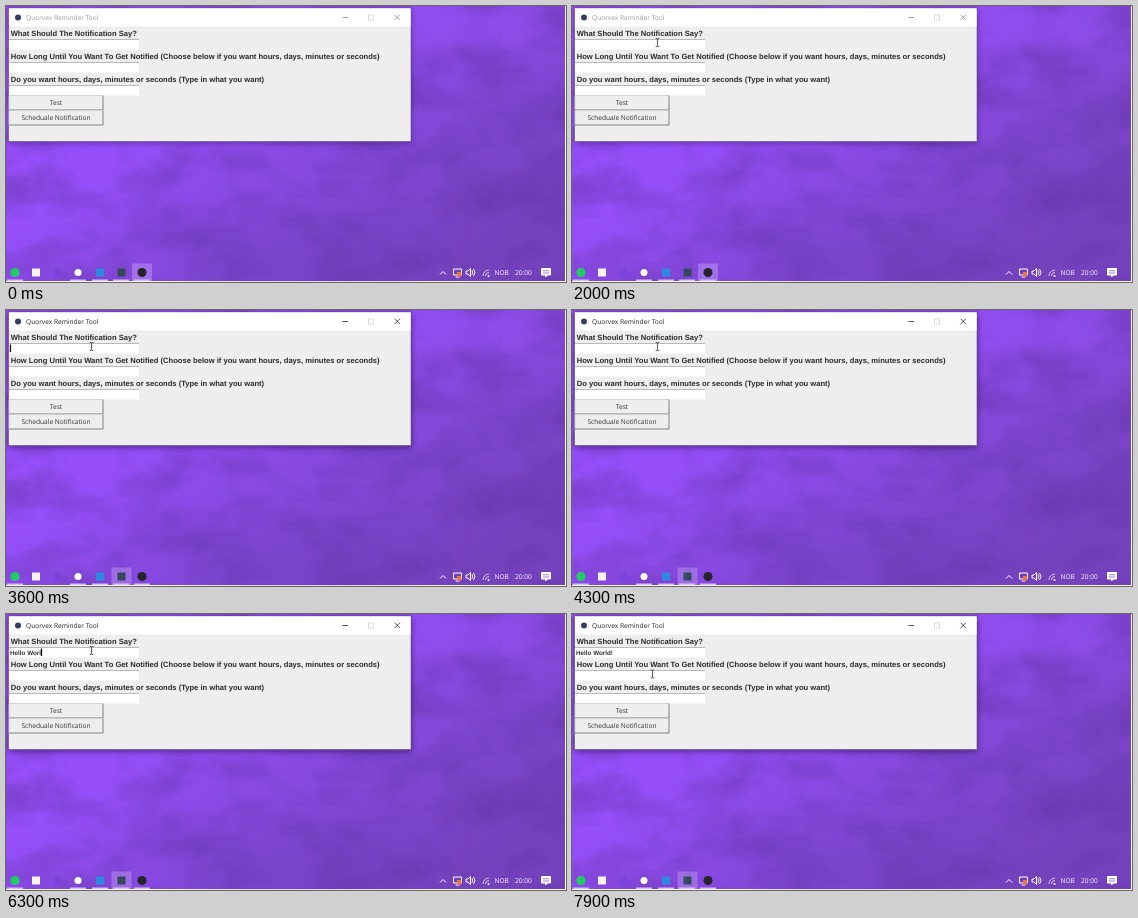
An HTML page for the animation above (8000 ms loop, 560 px wide and 276 px high).

```html
<!DOCTYPE html>
<html lang="en">
<head>
<meta charset="utf-8">
<title>Reminder Tool</title>
<style>
html, body { margin: 0; overflow: hidden; background: #fff; }
svg { display: block; text-rendering: geometricPrecision; }
.ui { font: 6.6px "Open Sans", sans-serif; }
.label { font: bold 7.6px "Liberation Sans", Arial, sans-serif; fill: #2a2a2a; }
#typed { font: bold 6.3px "Liberation Sans", Arial, sans-serif; fill: #333; }
.line { fill: none; stroke-width: .8; }
</style>
</head>
<body>
<svg width="560" height="276" viewBox="0 0 560 276">
  <defs>
    <linearGradient id="sky" x2="1" y2=".7">
      <stop offset="0" stop-color="#9a50ff"/>
      <stop offset=".4" stop-color="#954ef8"/>
      <stop offset=".75" stop-color="#8047d3"/>
      <stop offset="1" stop-color="#7442bd"/>
    </linearGradient>
    <filter id="clouds" x="0" y="0" width="1" height="1" color-interpolation-filters="sRGB">
      <feTurbulence type="fractalNoise" baseFrequency=".016 .024" numOctaves="5" seed="8"/>
      <feColorMatrix values="0 0 0 0 .38  0 0 0 0 .2  0 0 0 0 .64  1.100 0 0 0 -.42"/>
    </filter>
    <filter id="soft" x="-.5" y="-1" width="2" height="3"><feGaussianBlur stdDeviation="22"/></filter>
    <filter id="blur" x="-.1" y="-.2" width="1.2" height="1.4"><feGaussianBlur stdDeviation="3"/></filter>
  </defs>

  <rect width="559" height="275" fill="url(#sky)"/>
  <ellipse cx="300" cy="250" rx="130" ry="22" fill="#7040bd" opacity=".5" filter="url(#soft)"/>
  <ellipse cx="470" cy="30" rx="90" ry="25" fill="#9a52fa" opacity=".5" filter="url(#soft)"/>
  <rect width="559" height="275" filter="url(#clouds)"/>

  <rect id="shadow" x="3" y="4" width="402" height="133" filter="url(#blur)" fill="#20083f"/>
  <rect x="2.5" y="2" width="402.500" height="133.500" fill="#efeeef" stroke="#5d4a78" stroke-width=".6"/>
  <rect x="3" y="2.500" width="401.500" height="18" fill="#fff"/>
  <circle cx="12" cy="11.500" r="3" fill="#34405f"/>
  <g id="title">
    <text class="ui" x="20" y="14">Quorvex Reminder Tool</text>
    <path class="line" stroke="currentColor" d="M336.500 11.500h5.500M388.500 8.700l5.500 5.500m0-5.500l-5.500 5.500"/>
  </g>
  <rect class="line" x="362.500" y="9" width="5" height="5" stroke="#d0d0d0"/>
  <g id="form"></g>
  <text id="typed" x="4" y="40.500"></text>
  <rect id="caret" y="34.500" width="1.300" height="7.500" fill="#111"/>

  <rect id="active" y="257.500" width="20" height="17.500" fill="#d9c0ff" opacity=".32"/>
  <g id="apps"></g>
  <g class="line" stroke="#fff" style="stroke-width: 1">
    <path d="M434 268.500l3-3 3 3"/>
    <path d="M447.500 263h8v6h-8zM449.500 271h4"/>
    <path d="M460 265h2l2.500-2.500v8l-2.500-2.500h-2zM466 264.500q1.500 2 0 4M467.500 263q2.700 3.500 0 7"/>
    <path d="M477 270a6 6 0 0 1 6-6M479.500 270a3.500 3.500 0 0 1 3.500-3.500" opacity=".7"/>
    <path d="M535.500 262.500h9v6.500h-3l-2 2v-2h-4z" fill="#fff"/>
    <path d="M537 264.800h6M537 267h6" stroke="#7a4ac0" stroke-width=".7"/>
  </g>
  <rect x="451" y="266" width="4.500" height="4.500" fill="#e5794e"/>
  <circle cx="482.500" cy="270" r="1" fill="#fff"/>
  <g class="ui" fill="#fff"><text x="488.500" y="269">NOB</text><text x="509" y="269">20:00</text></g>

  <g id="pointer">
    <path id="arrow" d="M0 0v8.500l2-1.900 1.500 3.200 1.300-.6-1.500-3.100h2.700z" fill="#fff" stroke="#222" stroke-width=".6"/>
    <path id="beam" class="line" d="M-1.800-4h1.300l.5.500.5-.5h1.300M0-3.500v7M-1.800 4h1.300l.5-.5.5.5h1.300" stroke="#333"/>
  </g>
</svg>
<script>
const $ = id => document.getElementById(id);
const LOOP = 8000, STEP = 100;
const FOCUS = 2600, BLINK = 920, BLINK_ON = 610;
const MESSAGE = "Hello World!";
const keyTimes = [4800, 5000, 5300, 5400, 5500, 5700, 5900, 6000, 6100, 6200, 6400, 6800];
// time, x, y
const path = [
  [700, 528, 192], [1000, 470, 72], [1300, 219, 47], [1500, 125, 40],
  [1800, 85.5, 36.5], [7500, 85.5, 36.5], [7800, 80.5, 60]
];

const questions = [
  "What Should The Notification Say?",
  "How Long Until You Want To Get Notified (Choose below if you want hours, days, minutes or seconds)",
  "Do you want hours, days, minutes or seconds (Type in what you want)"
];
const row = (text, i) => {
  const y = 23 * i;
  return `<text class="label" x="4.700" y="${y + 29.7}">${text}</text>
    <rect x="3" y="${y + 33.5}" width="130" height="10" fill="#fff"/>
    <path class="line" d="M3 ${y + 33.5}h130" stroke="#aaa" stroke-width=".6"/>`;
};
const button = (text, y) => `
  <rect x="3" y="${y}" width="94" height="14.500" fill="#efeeef"/>
  <path class="line" d="M3 ${y + 14.5}V${y}h94" stroke="#ccc"/>
  <path class="line" d="M3 ${y + 14.5}h94v-14.500" stroke="#666"/>
  <text class="ui" x="50" y="${y + 9.6}" text-anchor="middle" fill="#333">${text}</text>`;
$("form").innerHTML = questions.map(row).join("") +
  button("Test", 89.5) + button("Scheduale Notification", 104.5);

const dot = (x, color, r = 4.5) => `<circle cx="${x}" cy="266.500" r="${r}" fill="${color}"/>`;
const square = (x, color) => `<rect x="${x - 4}" y="262.500" width="8" height="8" fill="${color}"/>`;
const underline = x => `<rect x="${x - 8}" y="273.500" width="16" height="1.500" fill="#d8bdf8"/>`;
$("apps").innerHTML = dot(9, "#1fce62") + square(30, "#f4f4f4") + dot(52, "#7a43dc", 4) +
  dot(72, "#fff", 3.5) + square(94, "#2b8be0") + square(115.5, "#34495e") + dot(136, "#25232b") +
  [9, 72, 94, 115, 136].map(underline).join("");

function pointerAt(t) {
  const i = path.findIndex(p => p[0] > t);
  if (i < 0) return path.at(-1).slice(1);
  const [t0, x0, y0] = path[i - 1], [t1, x1, y1] = path[i];
  const k = (t - t0) / (t1 - t0);
  return [x0 + (x1 - x0) * k, y0 + (y1 - y0) * k];
}
const overEntry = (x, y) => x > 3 && x < 133 && y > 33 && y < 90 && (y - 33) % 23 < 10.5;
const show = (id, on) => $(id).style.display = on ? "" : "none";

function draw(now) {
  const t = Math.floor(now % LOOP / STEP) * STEP;
  const focused = t >= FOCUS;

  $("title").style.cssText = focused ? "fill:#222;color:#222" : "fill:#999;color:#888";
  $("shadow").setAttribute("opacity", focused ? .6 : .4);
  $("active").setAttribute("x", focused ? 105.5 : 126);

  $("typed").textContent = MESSAGE.slice(0, keyTimes.filter(k => k <= t).length);
  show("caret", focused && (t - FOCUS) % BLINK < BLINK_ON);
  $("caret").setAttribute("x", 3.8 + $("typed").getComputedTextLength());

  const visible = t >= path[0][0];
  show("pointer", visible);
  if (visible) {
    const [x, y] = pointerAt(t), text = overEntry(x, y);
    $("pointer").setAttribute("transform", `translate(${x} ${y})`);
    show("arrow", !text);
    show("beam", text);
  }
  requestAnimationFrame(draw);
}
requestAnimationFrame(draw);
</script>
</body>
</html>
```
